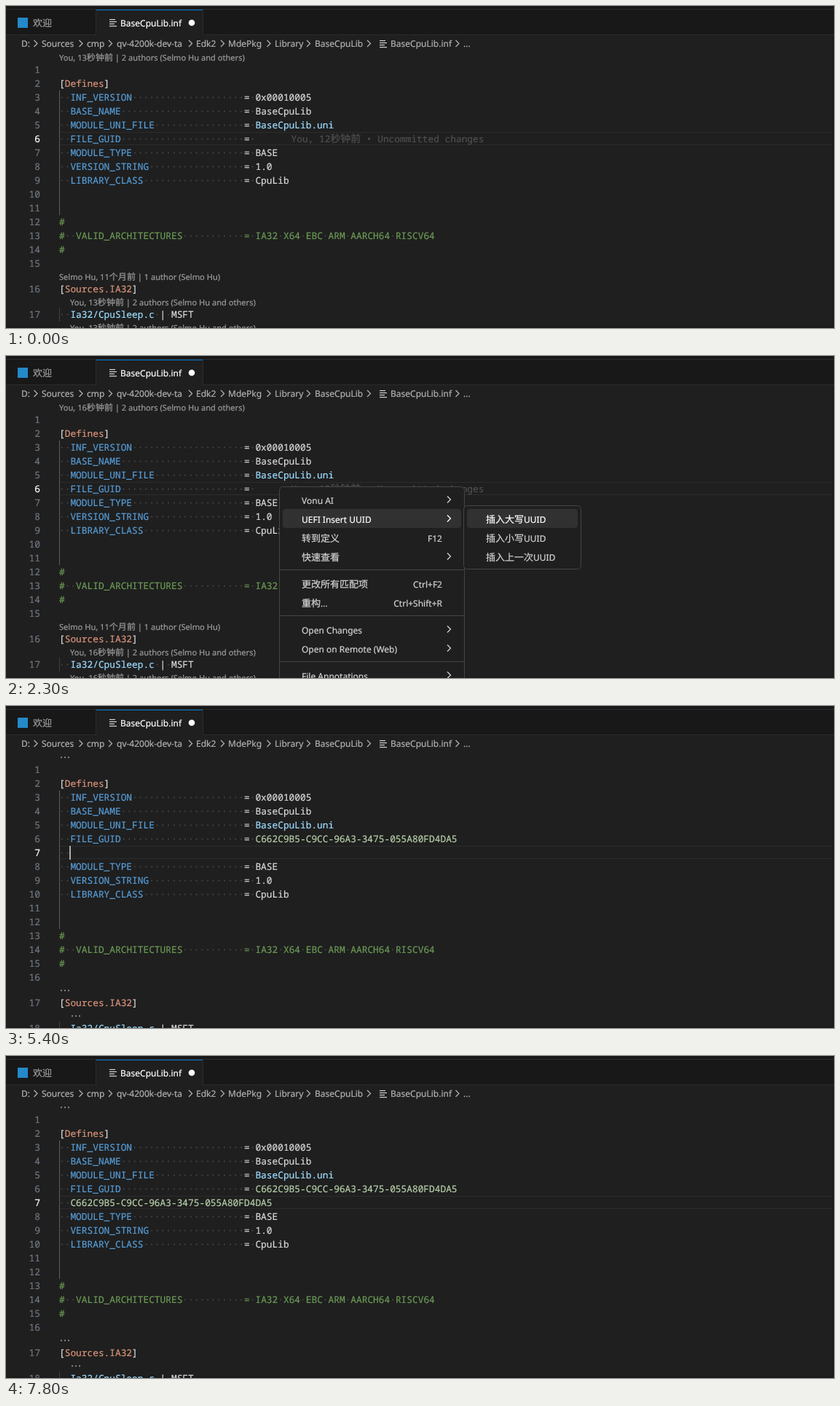
An HTML page that plays this animation: 1137x442 px, repeating every 8 s.

```html
<!DOCTYPE html>
<html lang="zh">
<head>
<meta charset="utf-8">
<title>Insert UUID</title>
<style>
html, body { margin: 0; width: 100%; height: 100%; overflow: hidden; background: #1f1f1f; }
svg { display: block; width: 100%; height: 100%; }
/* A hairline outline gives the text its slightly heavier weight. */
text { white-space: pre; text-rendering: geometricPrecision;
  fill: currentColor; stroke: currentColor; stroke-width: .22px; }
.ui { font: 12px "Noto Sans", "Open Sans", sans-serif; color: #d2d2d2; }
.lens { font: 11.1px "Noto Sans", "Open Sans", sans-serif; color: #999; }
.code { font: 12.83px "Noto Sans Mono", "DejaVu Sans Mono", monospace; color: #d8d8d8; }
.zh { font-family: "Noto Sans CJK SC", "Noto Sans CJK", sans-serif; font-size: 1.085em; }
.end { text-anchor: end; }
.num { color: #6e7681; }
.now, .hot { color: #fff; }
.key { color: #569cd6; }
.head { color: #d9937a; }
.path { color: #9cdcfe; }
.guid { color: #b5cea8; }
.note { color: #6a9955; }
.dot { color: #4a4a4a; }
.blame { color: #4f4f4f; }
.crumb { color: #b0b0b0; }
.tab { color: #9d9d9d; }
.line { fill: none; stroke-width: 1; }
.chevron { fill: none; stroke-width: 1.3; }
</style>
</head>
<body>
<svg id="stage" viewBox="0 0 1137 442" xmlns="http://www.w3.org/2000/svg"></svg>
<script>
const LOOP = 8000, LEFT = 73, CELL = 7.7, ROW = 19;
const GUID = 'C662C9B5-C9CC-96A3-3475-055A80FD4DA5';
const AUTHOR = 'Selmo Hu';

// Each step patches the state from its time on.
const steps = [
  [0, { lens: 13, blame: true, caret: null, menu: null, hot: -1, sub: null, subHot: -1,
        prompt: null, guid: false, extra: null }],
  [1000, { caret: [35, 6] }],
  [1300, { caret: null, menu: [375.5, 179.5] }],
  [1500, { hot: 0 }],
  [1700, { lens: 14 }],
  [1800, { sub: 'assist' }],
  [2000, { hot: 1, sub: null, lens: 16 }],
  [2100, { sub: 'uuid' }],
  [2300, { subHot: 0 }],
  [3000, { menu: null, hot: -1, sub: null, subHot: -1, prompt: 'caret' }],
  [3500, { prompt: 'idle' }],
  [4000, { prompt: null }],
  [4100, { guid: true, blame: false, caret: [71, 6] }],
  [4300, { caret: null }],
  [4900, { caret: [71, 6] }],
  [5000, { lens: null }],
  [5400, { extra: '  ', caret: [2, 7] }],
  [5900, { caret: null }],
  [6100, { menu: [504.5, 198.5] }],
  [6300, { hot: 0 }],
  [6500, { hot: 1 }],
  [6700, { sub: 'uuid' }],
  [6900, { subHot: 1 }],
  [7100, { subHot: 2 }],
  [7400, { menu: null, hot: -1, sub: null, subHot: -1, extra: '  ' + GUID, caret: [38, 7] }],
  [7800, { caret: null }]
];

const mainItems = [
  ['Vonu AI', '>'], ['UEFI Insert UUID', '>'], ['转到定义', 'F12'], ['快速查看', '>'], null,
  ['更改所有匹配项', 'Ctrl+F2'], ['重构...', 'Ctrl+Shift+R'], null,
  ['Open Changes', '>'], ['Open on Remote (Web)', '>'], null,
  ['File Annotations', '>']
];
const subMenus = {
  assist: { width: 293, dy: 0, items: [['Explain Code'], ['Generate Comment'], ['Check Performance'],
    ['Check Security'], ['Improve Readability']] },
  uuid: { width: 161, dy: 26, items: [['插入大写UUID'], ['插入小写UUID'], ['插入上一次UUID']] }
};

const zh = s => s.replace(/[\u4e00-\u9fff]+/g, m => `<tspan class="zh">${m}</tspan>`);
const text = (x, y, cls, s) => `<text x="${x}" y="${y}" class="${cls}">${zh(s)}</text>`;
const rect = (x, y, w, h, fill, more = '') =>
  `<rect x="${x}" y="${y}" width="${w}" height="${h}" fill="${fill}" ${more}/>`;
const path = (d, stroke, cls = 'line') => `<path class="${cls}" d="${d}" stroke="${stroke}"/>`;
const chevron = (x, y, stroke) => path(`M${x - 2.5} ${y - 4.5}l4.5 4.5l-4.5 4.5`, stroke, 'chevron');
const listIcon = (x, y) => [8, 10, 7, 10].map((w, i) => rect(x, y + i * 3, w, 1.2, '#d4d4d4')).join('');

// Coloured run of code; blanks become faint dots.
function span(cls, s) {
  const shown = s.replace(/ +/g, m => `<tspan class="dot">${'·'.repeat(m.length)}</tspan>`);
  return `<tspan class="${cls}">${shown}</tspan>`;
}
const define = (name, value, cls = '') =>
  span('key', ('  ' + name).padEnd(33)) + span('', '= ') + span(cls, value);
const section = name => span('', '[') + span('head', name) + span('', ']');

function chrome() {
  const crumbs = [['D:', 21], ['Sources', 49], ['cmp', 111], ['qv-4200k-dev-ta', 152], ['Edk2', 261],
    ['MdePkg', 305], ['Library', 369], ['BaseCpuLib', 424], ['BaseCpuLib.inf', 528], ['...', 628]];
  return rect(0, 0, 1137, 39, '#181818') + rect(0, 4, 1137, 1, '#2b2b2b') + rect(0, 39, 1137, 1, '#2b2b2b')
    + rect(124, 5, 146, 35, '#1f1f1f') + path('M123.5 5V39M270.5 5V39', '#2b2b2b')
    + rect(124, 5, 146, 1, '#0078d4')
    + rect(16, 16, 14, 14, '#2489ca') + text(37, 28, 'ui tab', '欢迎')
    + listIcon(142, 18) + text(157, 28, 'ui now', 'BaseCpuLib.inf')
    + '<circle cx="255" cy="23" r="4.3" fill="#fff"/>'
    + crumbs.map(([s, x]) => text(x, 56, 'ui crumb', s)).join('')
    + [41, 103, 143.5, 253.5, 297.5, 361, 415.5, 498.5, 620].map(x => chevron(x, 51.5, '#b0b0b0')).join('')
    + listIcon(513, 47)
    + rect(1135, 40, 2, 402, '#1a1a1a') + rect(0, 440, 1137, 2, '#1a1a1a');
}

function lens(x, y, s, own) {
  if (s.lens === null)
    return [3, 8, 13].map(dx => `<circle cx="${x + dx}" cy="${y - 4.5}" r="1.1" fill="#999"/>`).join('');
  return text(x, y, 'lens', own || `You, ${s.lens}秒钟前 | 2 authors (${AUTHOR} and others)`);
}

function editor(s) {
  const rows = ['', section('Defines'),
    define('INF_VERSION', '0x00010005'), define('BASE_NAME', 'BaseCpuLib'),
    define('MODULE_UNI_FILE', 'BaseCpuLib.uni', 'path'), define('FILE_GUID', s.guid ? GUID : '', 'guid'),
    define('MODULE_TYPE', 'BASE'), define('VERSION_STRING', '1.0'), define('LIBRARY_CLASS', 'CpuLib'),
    '', '', span('note', '#'),
    span('note', '#  VALID_ARCHITECTURES'.padEnd(33) + '= IA32 X64 EBC ARM AARCH64 RISCV64'),
    span('note', '#'), '', section('Sources.IA32'),
    span('path', '  Ia32/CpuSleep.c') + span('', ' | MSFT')];
  const grown = s.extra !== null;
  if (grown) rows.splice(6, 0, span('guid', s.extra));
  const current = grown ? 7 : 6, last = rows.length;
  const base = n => 92 + (n - 1) * ROW + (n >= last - 1 ? 16 : 0) + (n >= last ? 16 : 0);
  const top = n => base(n) - 14;

  let out = path(`M${LEFT} ${top(current) + .5}H1134M${LEFT} ${top(current) + 17.5}H1134`, '#2c2c2c');
  rows.forEach((row, i) => {
    const n = i + 1;
    out += text(47, base(n), 'code end ' + (n === current ? 'now' : 'num'), String(n));
    out += `<text x="${LEFT}" y="${base(n)}" class="code">${row}</text>`;
  });
  out += path(`M73.5 ${top(3)}V${top(last - 5)}`, '#5f5f5f');
  out += path(`M73.5 ${top(last)}v${ROW}`, '#404040');
  out += lens(LEFT, 75, s)
    + lens(LEFT, base(last - 1) - 17, s, `${AUTHOR}, 11个月前 | 1 author (${AUTHOR})`)
    + lens(LEFT + 15, base(last) - 17, s)
    + lens(LEFT + 15, base(last) + 18, s);
  if (s.blame) out += text(391.5, base(6), 'code blame', 'You, 12秒钟前 • Uncommitted changes');
  if (s.caret) {
    const [col, n] = s.caret;
    out += rect(Math.floor(LEFT + col * CELL - .5), top(n), 2, ROW, '#aeafad');
  }
  return out;
}

function panel(x, y, width, items, hot) {
  const height = items.reduce((h, it) => h + (it ? 26 : 11), 9);
  let out = rect(x, y, width, height, '#1f1f1f', 'rx="5" stroke="#454545"');
  let top = y + 4.5;
  items.forEach((item, i) => {
    if (!item) {
      out += path(`M${x} ${top + 5.5}h${width}`, '#454545');
      top += 11;
      return;
    }
    const [label, key] = item, cls = i === hot ? 'ui hot' : 'ui';
    if (i === hot) out += rect(x + 4.5, top, width - 9, 26, '#313131', 'rx="4"');
    out += text(x + 30.5, top + 18.5, cls, label);
    if (key === '>') out += chevron(x + 233, top + 13, i === hot ? '#fff' : '#d2d2d2');
    else if (key) out += text(x + 223.5, top + 18.5, cls + ' end', key);
    top += 26;
  });
  return out;
}

function menus(s) {
  if (!s.menu) return '';
  const [x, y] = s.menu, sub = subMenus[s.sub];
  return panel(x, y, 254, mainItems, s.hot)
    + (sub ? panel(x + 253, y + sub.dy, sub.width, sub.items, s.subHot) : '');
}

function prompt(s) {
  if (!s.prompt) return '';
  return rect(622.5, -30.5, 600, 87, '#222', 'rx="6" stroke="#3c3c3c"')
    + rect(628.5, -16.5, 588, 28, '#313131', 'rx="2" stroke="#0078d4"')
    + (s.prompt === 'caret' ? rect(631, -9, 1, 16, '#ccc') : '')
    + text(631, 34, 'ui', '请输入数量 (按 "Enter" 以确认或按 "Esc" 取消)');
}

const stage = document.getElementById('stage');
let shown = -1;

function tick() {
  const t = performance.now() % LOOP;
  const at = steps.filter(([from]) => from <= t).length;
  if (at !== shown) {
    const s = Object.assign({}, ...steps.slice(0, at).map(step => step[1]));
    stage.innerHTML = chrome() + editor(s) + menus(s) + prompt(s);
    shown = at;
  }
  requestAnimationFrame(tick);
}
tick();
</script>
</body>
</html>
```
